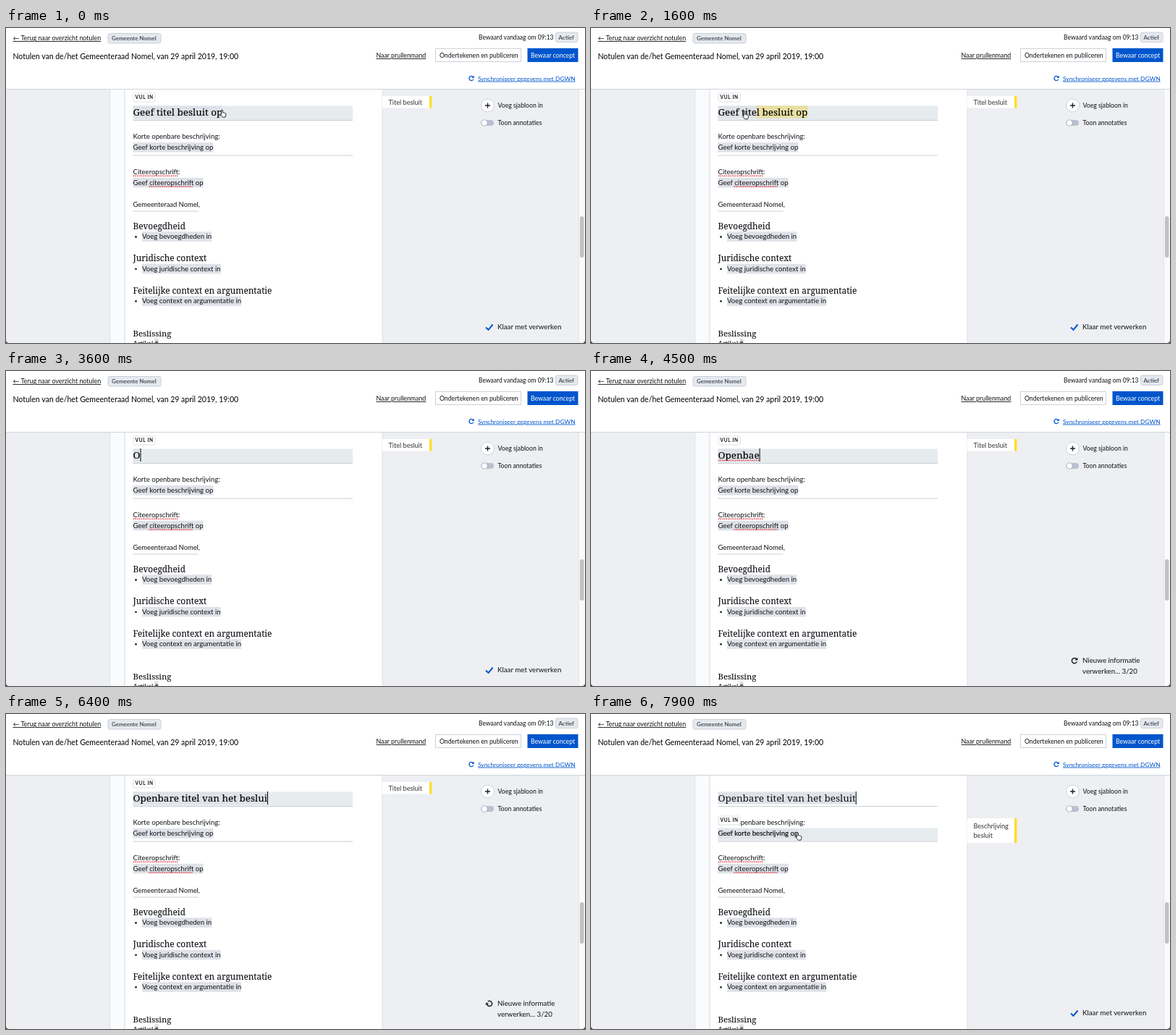
These frames come from a looping animation (800 by 435 pixels, 8000 ms). An HTML page:

```html
<!DOCTYPE html>
<html lang="nl">
<head>
<meta charset="utf-8">
<title>Notulen bewerken</title>
<style>
html, body { margin: 0; width: 100%; height: 100%; overflow: hidden; background: #fff; }
svg { display: block; width: 100%; height: 100%; }
text { font-family: Lato, "Open Sans", sans-serif; font-size: 8.7px; fill: #101216; white-space: pre; }
.body text { font-size: 9.62px; }
.body .head, .body #title { font-family: "Noto Serif", serif; font-size: 11.8px; }
.body .head { stroke: #101216; stroke-width: .1px; }
.body #title { font-size: 13.45px; }
.card text { font-size: 9.1px; fill: #333; }
.status text { font-size: 9.75px; }
.badge { font-size: 7.9px; font-weight: 700; fill: #4a525e; }
.link { text-decoration: underline; text-decoration-thickness: .7px; }
.blue { fill: #05c; }
.active { fill: #000; stroke: #000; stroke-width: .12px; }
.mark { fill: #dfe2e8; }
.bar { fill: #e6ebee; }
.rule { stroke: #c9cfd7; fill: none; }
.typo { stroke: #e0303a; stroke-width: 1.4; stroke-dasharray: 1.4 1.2; }
.box { fill: #fff; stroke: #cbd2db; }
</style>
</head>
<body>
<svg viewBox="0 0 800 435">
  <defs>
    <g id="reload">
      <path d="M3.2-1.6A3.6 3.6 0 1 0 3.3 1.5" fill="none" stroke="currentColor" stroke-width="1.5"/>
      <path d="M4.4-4.4V-.5H.5Z" fill="currentColor"/>
    </g>
  </defs>

  <rect width="800" height="435" fill="#edeff2"/>
  <rect x="143" y="84" width="378" height="351" fill="#e2e5e9"/>
  <rect x="144.5" y="84" width="375" height="351" fill="#fff"/>
  <rect x="144.5" y="84" width="19" height="351" fill="#fafbfc"/>
  <path class="rule" d="M164 84V435" stroke-opacity=".8"/>

  <g class="body">
    <rect id="titleBar" class="bar" x="175.5" y="107.5" width="303.5" height="19.5"/>
    <rect id="descBar" class="bar" x="175.5" y="157.5" width="303.5" height="18"/>
    <path class="rule" d="M175.5 127.5H479M175.5 176H479M175.5 253H265.5"/>
    <rect id="titleMark" class="mark" x="175.5" y="107.5" height="17"/>
    <rect id="selection" y="107.5" height="17" fill="#e9dfa2"/>
    <text id="title" x="175.5" y="120.5"></text>
    <path id="titleTypo" class="typo" d="M176 123.5H232"/>
    <path id="caret" d="M0 107V125" stroke="#000"/>

    <text x="175.5" y="153" style="font-size:9.55px">Korte openbare beschrijving:</text>
    <text id="desc" class="m" x="175.5" y="168">Geef korte beschrijving op</text>
    <text x="175.5" y="202" style="font-size:9.55px">Citeeropschrift:</text>
    <text class="m" x="175.5" y="216.8">Geef citeeropschrift op</text>
    <path class="typo" d="M176 204.3H238M197.5 219H258"/>
    <text x="175.5" y="247" style="font-size:9.4px">Gemeenteraad Nomel,</text>
    <text class="head" x="175.5" y="278">Bevoegdheid</text>
    <text class="m" x="188" y="291.3">Voeg bevoegdheden in</text>
    <text class="head" x="175.5" y="322.3">Juridische context</text>
    <text class="m" x="188" y="335.8">Voeg juridische context in</text>
    <text class="head" x="175.5" y="366.8">Feitelijke context en argumentatie</text>
    <text class="m" x="188" y="380.3">Voeg context en argumentatie in</text>
    <text class="head" x="175.5" y="426" style="font-size:11.3px">Beslissing</text>
    <text x="175.5" y="438.5">Artikel </text>
    <text class="m" x="205" y="438.5">#</text>
    <g fill="#222">
      <circle cx="179.5" cy="288.5" r="1.4"/>
      <circle cx="179.5" cy="332.8" r="1.4"/>
      <circle cx="179.5" cy="377.3" r="1.4"/>
    </g>
  </g>

  <g id="tag">
    <rect x="176" y="90" width="30" height="12" rx="2" fill="#fff" stroke="#dde1e6"/>
    <text x="178.5" y="98.3" style="font-size:6.5px;font-weight:700;letter-spacing:.7px">VUL IN</text>
  </g>

  <g id="titleCard" class="card">
    <rect x="520" y="94" width="68.5" height="16.5" fill="#fff"/>
    <rect x="585" y="94" width="3.5" height="16.5" fill="#fadf2d"/>
    <text x="528.5" y="105.5">Titel besluit</text>
  </g>
  <g id="descCard" class="card">
    <rect x="520" y="144" width="68.5" height="34" fill="#fff"/>
    <rect x="585" y="144" width="3.5" height="34" fill="#fadf2d"/>
    <text x="528.5" y="157.5">Beschrijving</text>
    <text x="528.5" y="171.3">besluit</text>
  </g>

  <circle class="box" cx="665.5" cy="107" r="9"/>
  <path d="M662 107H669M665.5 103.5V110.5" stroke="#222" stroke-width="1.4"/>
  <text x="679.5" y="110">Voeg sjabloon in</text>
  <rect x="656.5" y="127" width="17.5" height="8" rx="4" fill="#b9c0d0"/>
  <circle cx="661" cy="131" r="4.2" fill="#fff" stroke="#9ca6b8" stroke-width=".8"/>
  <text x="679.5" y="134.3">Toon annotaties</text>

  <g id="done" class="status">
    <path d="M663 413.5L666.5 416.8L672.5 409.5" fill="none" stroke="#05c" stroke-width="2"/>
    <text x="679" y="416.3">Klaar met verwerken</text>
  </g>
  <g id="busy" class="status">
    <use id="spinner" href="#reload" color="#222"/>
    <text x="679" y="403">Nieuwe informatie</text>
    <text x="679" y="418">verwerken... 3/20</text>
  </g>

  <rect x="791" y="85" width="9" height="350" fill="#fafafa"/>
  <path d="M791.5 85V435" stroke="#e4e4e6"/>
  <rect x="793" y="260" width="5.5" height="57" rx="2.7" fill="#c1c1c3"/>

  <rect width="800" height="84" fill="#fff"/>
  <path d="M0 84.5H800" stroke="#cfd5dc"/>
  <text class="link" x="9.5" y="17" style="font-size:8.88px">← Terug naar overzicht notulen</text>
  <rect x="141" y="7.5" width="73" height="13.5" rx="2.5" fill="#e5e9ee" stroke="#c9d0d8"/>
  <text class="badge" x="146" y="17.3">Gemeente Nomel</text>
  <text x="9.5" y="43" style="font-size:10.5px;fill:#000">Notulen van de/het Gemeenteraad Nomel, van 29 april 2019, 19:00</text>
  <text x="653" y="16" style="font-size:8.5px">Bewaard vandaag om 09:13</text>
  <rect x="759.5" y="6" width="30.5" height="13.5" rx="2.5" fill="#e5e9ee" stroke="#c9d0d8"/>
  <text class="badge" x="763.5" y="15.8">Actief</text>
  <text class="link" x="511.5" y="41" style="font-size:8.8px">Naar prullenmand</text>
  <rect class="box" x="593.5" y="28.5" width="118" height="18"/>
  <text x="599" y="40.6">Ondertekenen en publiceren</text>
  <rect class="blue" x="720.5" y="28" width="70" height="19"/>
  <text x="725" y="40.6" style="fill:#fff">Bewaar concept</text>
  <use href="#reload" color="#05c" transform="translate(643 69.5) scale(.85)"/>
  <text class="link blue" x="652" y="72.6" style="font-size:8.42px">Synchroniseer gegevens met DGWN</text>

  <path d="M0 431V435H4Q0 435 0 431M800 431V435H796Q800 435 800 431" fill="#222"/>
  <path id="hand" d="M.2 1.2Q.2 0 1.2 0T2.3 1.2V4.4Q3.2 3.8 3.9 4.8Q5 4.3 5.6 5.3Q7.4 5 7.4 6.8V8.5L6.4 11.8H2L-.6 8.6Q-2.4 6.9-1.3 6.4Q-.6 6.1 .2 7.1Z" fill="#fff" stroke="#111" stroke-width="1"/>
</svg>
<script>
const LOOP = 8000, STEP = 100, LEFT = 175.5;
const PROMPT = 'Geef titel besluit op', TYPO = 'Openbae', FINAL = 'Openbare titel van het besluit';
const TYPE_START = 3500, FIX_START = 4600, LEAVE = 6900, ENTER = 7500;

// Fingertip of the pointer: time, x, y
const PATH = [
  [0, 297.5, 113], [500, 297.5, 113], [800, 264.5, 114], [1500, 215, 115.5],
  [2300, 183, 116], [2600, 179.5, 116], [6700, 179.5, 116],
  [7200, 263.5, 174], [7500, 275, 171.5], [7900, 284.5, 164]
];
const TAG_FADE = [[0, 1], [600, 1], [800, .2], [900, 0], [1100, 0], [1300, 1],
  [LEAVE - 100, 1], [LEAVE + 100, 0], [ENTER, 0], [ENTER + 200, 1]];

const $ = id => document.getElementById(id);
const show = (id, on) => $(id).style.display = on ? '' : 'none';
const set = (id, attrs) => { for (const k in attrs) $(id).setAttribute(k, attrs[k]); };

function track(keys, t, col = 1) {
  const i = keys.findIndex(k => k[0] > t);
  if (i < 0) return keys[keys.length - 1][col];
  const a = keys[i - 1], b = keys[i];
  return a[col] + (b[col] - a[col]) * (t - a[0]) / (b[0] - a[0]);
}

function titleAt(t) {
  if (t < TYPE_START) return PROMPT;
  if (t < FIX_START) return TYPO.slice(0, 1 + Math.floor((t - TYPE_START) / 150));
  return FINAL.slice(0, 6 + Math.floor((t - FIX_START) / 78));
}

// Left edge of the selection, snapped to the nearest letter
function selectionStart(t) {
  const x = track(PATH, t - 250);
  let best = LEFT;
  for (let i = 1; i < PROMPT.length; i++) {
    const edge = $('title').getStartPositionOfChar(i).x;
    if (Math.abs(edge - x) < Math.abs(best - x)) best = edge;
  }
  return best;
}

function draw(t) {
  const inTitle = t < LEAVE, inDesc = t >= ENTER;
  const typing = t >= TYPE_START && t < 6600;

  $('title').textContent = titleAt(t);
  $('title').classList.toggle('active', inTitle);
  $('desc').classList.toggle('active', inDesc);
  const width = $('title').getComputedTextLength(), end = LEFT + width;
  set('titleMark', { width });

  const selecting = t >= 750 && t < TYPE_START;
  show('selection', selecting);
  if (selecting) {
    const x = selectionStart(t);
    set('selection', { x, width: end - x });
  }

  show('titleTypo', t >= 4000 && t < 4750);
  set('titleTypo', { d: `M176 123.5H${end}` });
  show('caret', typing || t >= 6600 && (t - 6600) % 1000 < 500);
  set('caret', { transform: `translate(${end + .5} 0)` });

  show('titleBar', inTitle);
  show('titleCard', inTitle);
  show('descBar', inDesc);
  show('descCard', inDesc);
  set('tag', { opacity: track(TAG_FADE, t), transform: `translate(0 ${inDesc ? 51 : 0})` });

  const busy = t >= 3700 && t < 7000;
  show('busy', busy);
  show('done', !busy);
  set('spinner', { transform: `translate(668 400) rotate(${(t - 4500) * .3})` });

  show('hand', t < TYPE_START || t >= 6700);
  set('hand', { transform: `translate(${track(PATH, t)} ${track(PATH, t, 2)}) scale(.86)` });
}

for (const text of document.querySelectorAll('.m')) {
  const mark = document.createElementNS('http://www.w3.org/2000/svg', 'rect');
  const attrs = { class: 'mark', x: text.getAttribute('x'), y: text.getAttribute('y') - 10,
    width: text.getComputedTextLength(), height: 13.5 };
  for (const k in attrs) mark.setAttribute(k, attrs[k]);
  text.before(mark);
}

const start = performance.now();
function frame() {
  const t = (performance.now() - start) % LOOP;
  draw(Math.floor(t / STEP) * STEP);
  requestAnimationFrame(frame);
}
frame();
</script>
</body>
</html>
```
